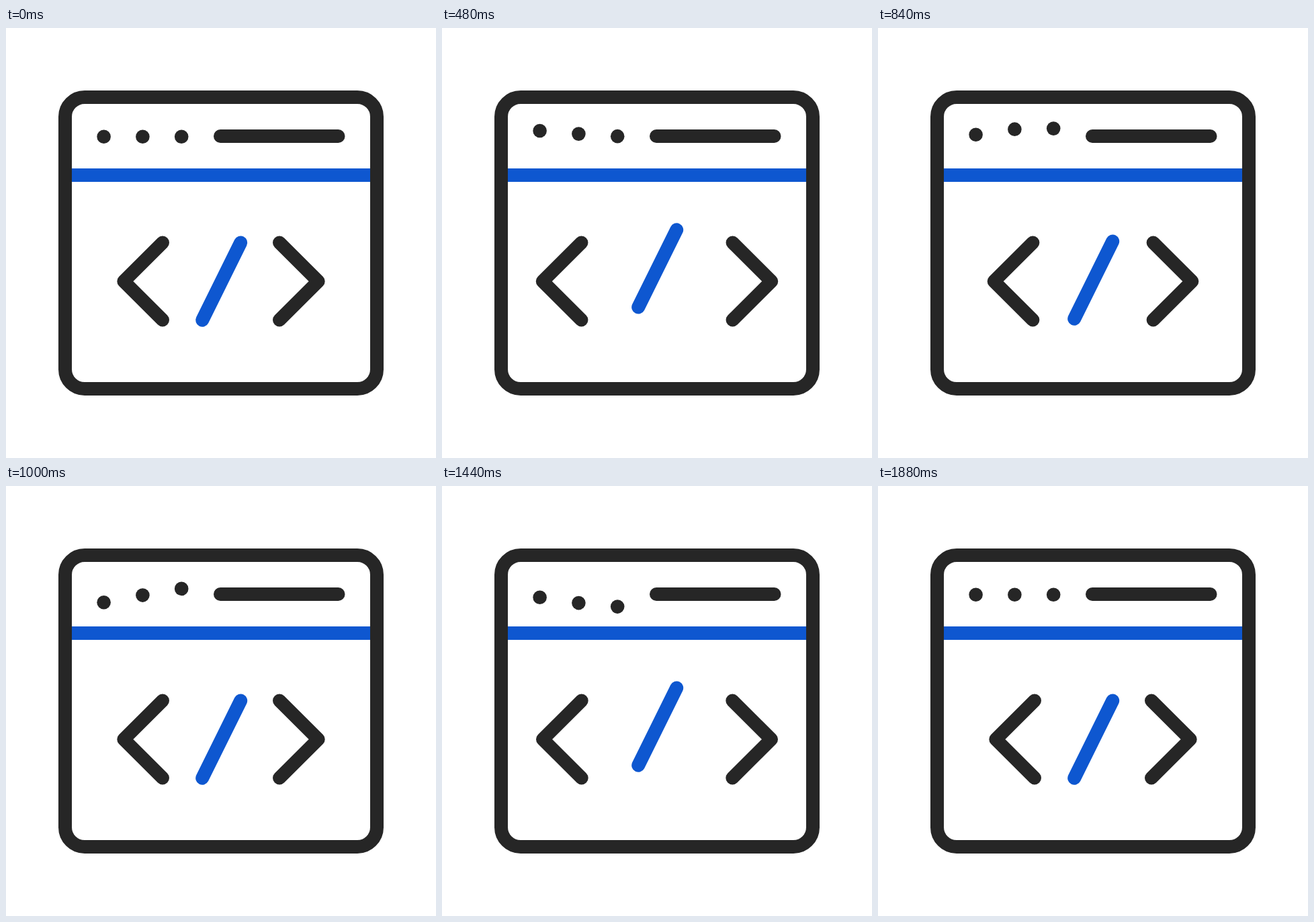
An HTML page that plays this animation: 640x640 px, repeating every 1920 ms.

```html
<!DOCTYPE html>
<html lang="en">
<head>
<meta charset="utf-8">
<title>Code window</title>
<style>
html, body { margin: 0; width: 100%; height: 100%; overflow: hidden; background: #fff; }
svg { display: block; width: 100vw; height: 100vh; }
</style>
</head>
<body>
<svg viewBox="0 0 640 640" fill="none" stroke="#262626" stroke-width="20" stroke-linecap="round" stroke-linejoin="round">
  <path d="M98 219H542" stroke="#0e57d0" stroke-linecap="butt"/>
  <rect x="88" y="103" width="464" height="434" rx="29"/>
  <path d="M319 161H494.500"/>
  <g fill="#262626" stroke="none">
    <circle class="dot" cx="145.600" r="10.300"/>
    <circle class="dot" cx="203.400" r="10.300"/>
    <circle class="dot" cx="261.200" r="10.300"/>
  </g>
  <path id="left" d="M233 319.500L175.300 377L233 434.500"/>
  <path id="slash" d="M349.200 319.500L292.200 434.700" stroke="#0e57d0"/>
  <path id="right" d="M407 319.500L464.700 377L407 434.500"/>
</svg>
<script>
const STEP = 40, STEPS = 48;
const left = document.getElementById('left');
const right = document.getElementById('right');
const slash = document.getElementById('slash');
const dots = document.querySelectorAll('.dot');

// Cubic Bezier easing through (x1, 0) and (x2, 1), solved by bisection
const bezier = (x1, x2) => u => {
  let lo = 0, hi = 1, t = 0.5;
  for (let i = 0; i < 24; i++) {
    t = (lo + hi) / 2;
    const x = 3 * (1 - t) ** 2 * t * x1 + 3 * (1 - t) * t * t * x2 + t ** 3;
    if (x < u) lo = t; else hi = t;
  }
  return t * t * (3 - 2 * t);
};
const smooth = u => u * u * (3 - 2 * u);
const settle = bezier(0.42, 0.45);

// Each move: [start, end, target, easing], times in steps
function follow(value, moves, k) {
  for (const [start, end, target, ease] of moves) {
    if (k <= start) break;
    value += (target - value) * ease(Math.min(1, (k - start) / (end - start)));
  }
  return value;
}

const spread = [
  [2, 13, 25.8, settle],
  [13, 24, 0, settle],
  [24.8, 35, 25.8, settle],
  [35, 45.5, 0, settle]
];
const bounce = [
  [4.5, 16.2, 149.3, smooth],
  [16.5, 28.7, 180, smooth],
  [28.9, 40.4, 161.8, settle]
];

function draw() {
  const k = Math.floor(performance.now() / STEP) % STEPS;
  const d = follow(0, spread, k);
  left.setAttribute('transform', `translate(${-d} 0)`);
  right.setAttribute('transform', `translate(${d} 0)`);
  slash.setAttribute('transform', `translate(0 ${-d * 0.75})`);
  dots.forEach((dot, i) => dot.setAttribute('cy', follow(161.8, bounce, k - i * 2.95)));
  requestAnimationFrame(draw);
}
draw();
</script>
</body>
</html>
```
